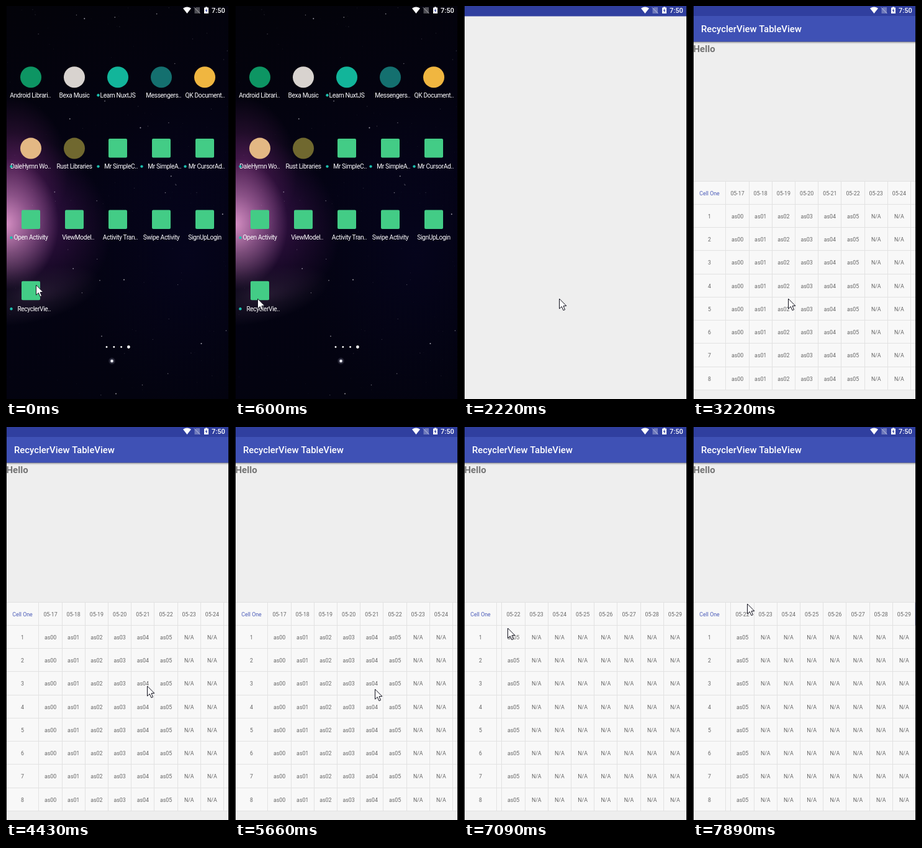
An HTML page with a canvas for the animation above (8 s loop, 359 by 631 pixels).

```html
<!DOCTYPE html>
<html lang="en">
<head>
<meta charset="utf-8">
<title>Table demo</title>
<style>
html, body { margin: 0; width: 100%; height: 100%; overflow: hidden; background: #000; }
canvas { display: block; width: 359px; height: 631px; }
</style>
</head>
<body>
<canvas id="stage" width="359" height="631"></canvas>
<script>
const W = 359, H = 631, LOOP = 8000, STEP = 200;
const ctx = document.getElementById('stage').getContext('2d');

// Pointer strokes as cubic curves; each begins where the previous one ended
const HOME = [48, 447];
const STROKES = [
  { from: 0, to: 600, curve: [[99, 476], [95, 483], [36, 469]] },
  { from: 1800, to: 2220, curve: [[75, 472], [114, 472], [153, 469]] },
  { from: 3690, to: 4830, curve: [[274, 423], [254, 400], [93, 400]] },
  { from: 4860, to: 5660, curve: [[-194, 404], [412, 418], [225, 420]] },
  { from: 5860, to: 7090, curve: [[225, 311], [220, 311], [70, 322]] },
  { from: 7090, to: 7890, curve: [[60, 318], [120, 285], [87, 283]] }
];

// A leading "*" marks a label with a dot
const DEFAULT_ICON = '#43cc86';
const APPS = [
  ['Android Librari..', '#0d9563'], ['Bexa Music', '#d8d3cf'], ['*Learn NuxtJS', '#12b59a'],
  ['Messengers..', '#14706f'], ['QK Document..', '#f0b640'],
  ['*DaleHymn Wo..', '#e3b884'], ['Rust Libraries', '#70682f'], ['*Mr SimpleC..'],
  ['*Mr SimpleA..'], ['*Mr CursorAd..'],
  ['*Open Activity'], ['ViewModel..'], ['Activity Tran..'], ['Swipe Activity'], ['SignUpLogin'],
  ['*RecyclerVie..']
];

const clamp = v => Math.min(1, Math.max(0, v));

// The picture advances in steps while the pointer moves
function heldTime(t, { from, to }) {
  return t >= to ? to : from + Math.floor((t - from) / STEP) * STEP;
}

function cubic(p, a, b, c, d) {
  const q = 1 - p;
  return q * q * q * a + 3 * q * q * p * b + 3 * q * p * p * c + p * p * p * d;
}

function pointerAt(t) {
  const i = STROKES.findLastIndex(s => s.from <= t);
  const stroke = STROKES[i];
  const start = i ? STROKES[i - 1].curve[2] : HOME;
  const p = (heldTime(t, stroke) - stroke.from) / (stroke.to - stroke.from);
  return [0, 1].map(k => Math.round(cubic(p, start[k], ...stroke.curve.map(pt => pt[k]))));
}

function scrollAt(t) {
  const p = clamp((heldTime(t, STROKES[4]) - 6260) / 830);
  return Math.round(178 * p ** 2.2);
}

function rect(x, y, w, h, fill) {
  ctx.fillStyle = fill;
  ctx.fillRect(x, y, w, h);
}

function disc(x, y, r, fill) {
  ctx.fillStyle = fill;
  ctx.beginPath();
  ctx.arc(x, y, r, 0, Math.PI * 2);
  ctx.fill();
}

function poly(points, fill, stroke) {
  ctx.beginPath();
  points.forEach(([x, y]) => ctx.lineTo(x, y));
  ctx.closePath();
  if (fill) { ctx.fillStyle = fill; ctx.fill(); }
  if (stroke) { ctx.strokeStyle = stroke; ctx.lineWidth = 1; ctx.stroke(); }
}

function text(str, x, y, size, fill, weight = 400, align = 'left') {
  ctx.font = `${weight} ${size}px Roboto, sans-serif`;
  ctx.textAlign = align;
  ctx.fillStyle = fill;
  ctx.fillText(str, x, y);
}

function glow(x, y, rx, ry, angle, rgb, alpha) {
  ctx.save();
  ctx.translate(x, y);
  ctx.rotate(angle);
  ctx.scale(1, ry / rx);
  const g = ctx.createRadialGradient(0, 0, 0, 0, 0, rx);
  g.addColorStop(0, `rgba(${rgb},${alpha})`);
  g.addColorStop(0.45, `rgba(${rgb},${alpha * 0.5})`);
  g.addColorStop(1, `rgba(${rgb},0)`);
  rect(-rx, -rx, rx * 2, rx * 2, g);
  ctx.restore();
}

function random(seed) {
  return () => (seed = (seed * 16807) % 2147483647) / 2147483647;
}

function wallpaper() {
  const sky = ctx.createLinearGradient(0, 0, W * 0.5, H);
  sky.addColorStop(0, '#030309');
  sky.addColorStop(0.5, '#040314');
  sky.addColorStop(1, '#03030f');
  rect(0, 0, W, H, sky);
  glow(290, 400, 170, 260, 0, '8,6,42', 0.4);
  glow(30, 340, 150, 125, 0.75, '84,26,100', 0.8);
  glow(15, 255, 85, 110, -0.15, '104,36,104', 0.6);
  glow(0, 350, 85, 105, 0, '222,150,202', 0.95);
  glow(45, 465, 110, 42, -0.25, '58,42,68', 0.6);

  const next = random(77);
  for (let i = 0; i < 170; i++) {
    const x = next() * W, y = next() * H, light = next() ** 4;
    disc(x, y, 0.4 + light * 0.6, `rgba(215,212,222,${0.15 + light * 0.6})`);
  }
  glow(170.5, 570, 6, 6, 0, '190,190,220', 0.6);
  disc(170.5, 570, 2.2, '#eeeef4');
}

function appIcon(x, y, color) {
  if (color) return disc(x, y, 17, color);
  ctx.fillStyle = DEFAULT_ICON;
  ctx.beginPath();
  ctx.roundRect(x - 15, y - 15.5, 30, 30.5, 2);
  ctx.fill();
}

function launcher() {
  wallpaper();
  APPS.forEach(([name, color], i) => {
    const x = 40 + (i % 5) * 70, y = 114.3 + Math.floor(i / 5) * 114.3;
    const label = name.replace('*', ''), cut = label.endsWith('..');
    appIcon(x, y, color);
    ctx.letterSpacing = '-0.35px';
    text(label, cut ? x + 32 : x, Math.round(y + 32.5), 10.2, '#fff', 400, cut ? 'right' : 'center');
    ctx.letterSpacing = '0px';
    if (label !== name) disc(x - 31.5, y + 29, 2.2, '#1cbfae');
  });
  for (let i = 0; i < 4; i++) disc(162 + i * 11.8, 547.5, i < 3 ? 1.4 : 2.4, '#fff');
}

function statusIcons() {
  ctx.fillStyle = '#fff';
  ctx.beginPath();
  ctx.moveTo(291.5, 12);
  ctx.lineTo(285, 3.8);
  ctx.quadraticCurveTo(291.5, -0.6, 298, 3.8);
  ctx.fill();

  const dim = 'rgba(255,255,255,.3)';
  poly([[306, 2], [312, 2], [312, 12], [303.5, 12], [303.5, 4.5]], dim);
  poly([[302.5, 2], [312.5, 12]], null, dim);

  rect(319, 2.5, 7, 9.5, '#fff');
  rect(321, 1.5, 3, 1.5, '#fff');
  poly([[323.2, 3.8], [320.6, 7.8], [322.3, 7.8], [321.8, 10.8], [324.5, 6.7], [322.8, 6.7]], '#303f9f');
  text('7:50', 331, 10.5, 11, '#fff', 500);
}

const CELL = 37.2, ROW = 37.28, TOP = 281, FIXED = 53, BOTTOM = 616, COLS = 13, ROWS = 8;
const INK = '#666', RULE = '#e2e2e2', PAPER = '#f8f8f8';

function cell(str, x, row, fill = INK) {
  text(str, x, 303.5 + row * ROW, 8.8, fill, 400, 'center');
}

function table(t) {
  const scroll = scrollAt(t);
  rect(1, TOP, 357, BOTTOM - TOP, PAPER);

  ctx.save();
  ctx.beginPath();
  ctx.rect(FIXED, TOP, 358 - FIXED, BOTTOM - TOP);
  ctx.clip();
  for (let c = 0; c < COLS; c++) {
    const x = 71.5 + c * CELL - scroll;
    rect(Math.round(x + 18.1), TOP, 1, BOTTOM - TOP, RULE);
    cell('05-' + (17 + c), x, 0);
    for (let r = 1; r <= ROWS; r++) cell(c < 6 ? 'as0' + c : 'N/A', x, r);
  }
  ctx.restore();

  rect(FIXED - 1, TOP, 1, BOTTOM - TOP, RULE);
  cell('Cell One', 26.5, 0, '#4a5bb8');
  for (let r = 1; r <= ROWS; r++) cell(r, 26.5, r);
  for (let r = 0; r <= ROWS + 1; r++) rect(1, Math.floor(TOP + r * ROW), 357, 1, RULE);

  // Overscroll glow on the right edge: body first, then header
  const edge = 'rgba(63,81,181,.25)';
  if (t >= 7890) rect(357, TOP + 1, 1, ROW - 1, edge);
  else if (t >= 7290 && t < 7690) rect(357, TOP + ROW, 1, BOTTOM - TOP - ROW, edge);
}

function app(t) {
  rect(0, 0, W, H, '#eee');
  rect(0, 0, W, 16.5, '#303f9f');
  if (t < 3220) return;
  rect(0, 16, W, 41.5, '#3f51b5');
  const shade = ctx.createLinearGradient(0, 57, 0, 61);
  shade.addColorStop(0, 'rgba(0,0,0,.32)');
  shade.addColorStop(1, 'rgba(0,0,0,0)');
  rect(0, 57, W, 4, shade);
  text('RecyclerView TableView', 13, 42, 14.9, '#fff', 500);
  text('Hello', 0.5, 73.5, 15, '#747474', 700);
  table(t);
}

function pointer([x, y]) {
  ctx.save();
  ctx.translate(x + 0.5, y + 1);
  poly([[0, 0], [0, 16], [3.8, 12.6], [6.4, 18.6], [9, 17.6], [6.5, 11.7], [11.3, 11.4]], '#fff', '#10101c');
  ctx.restore();
}

function frame(now) {
  const t = now % LOOP;
  if (t < 1800) launcher();
  else app(t);
  statusIcons();
  pointer(pointerAt(t));
  rect(0, 0, 1, H, '#000');
  rect(358, 0, 1, H, '#000');
}

const start = performance.now();
function tick() {
  frame(performance.now() - start);
  requestAnimationFrame(tick);
}
tick();
</script>
</body>
</html>
```
